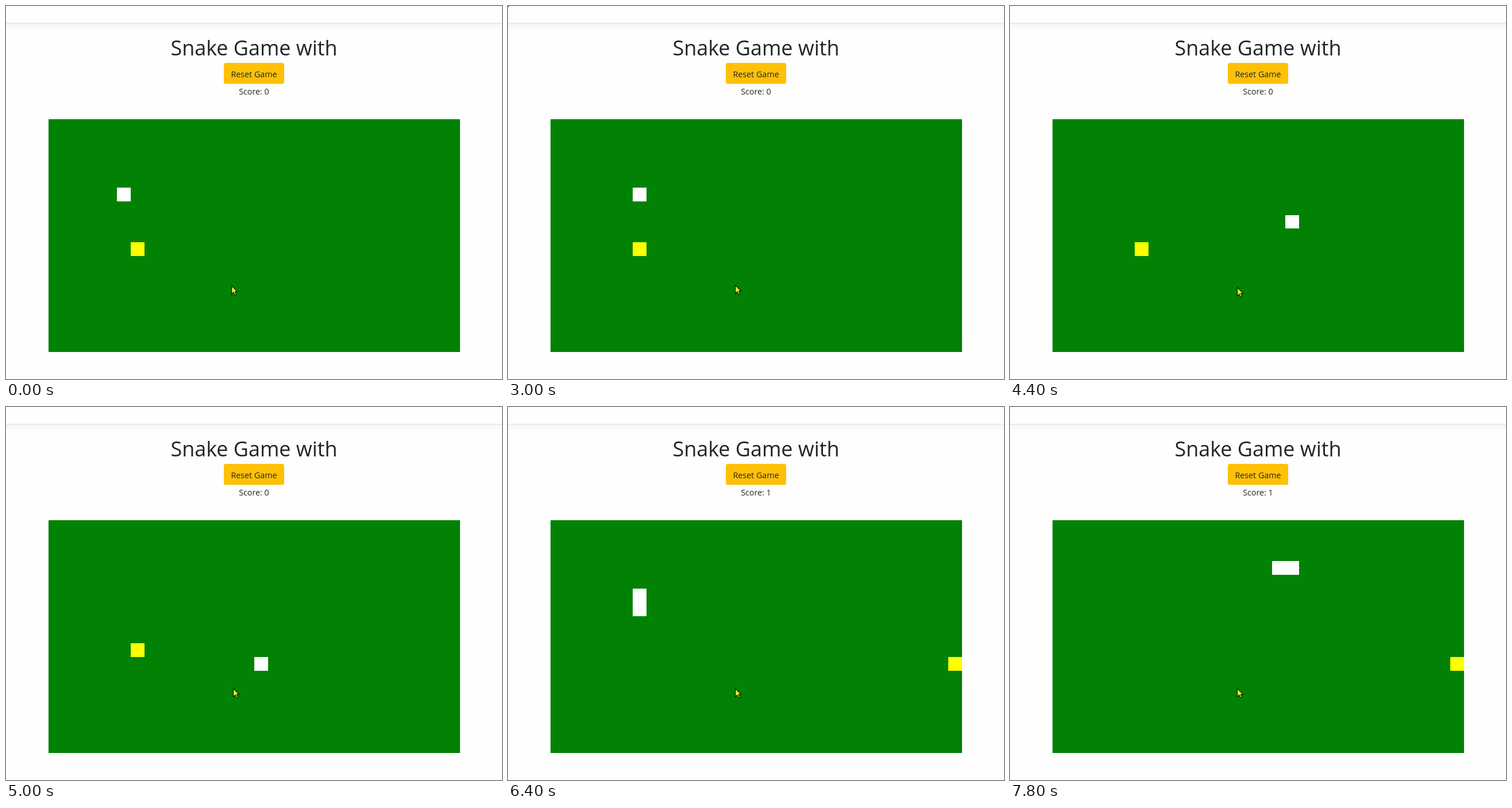
An HTML page for the animation above (8000 ms loop, 863 by 649 pixels).

```html
<!DOCTYPE html>
<html lang="en">
<head>
<meta charset="utf-8">
<title>Snake Game</title>
<style>
  html, body { margin: 0; width: 100%; height: 100%; overflow: hidden; background: #fdfefd; }
  svg { display: block; width: 863px; height: 649px; }
  text { font-family: "Open Sans", "Noto Sans", sans-serif; font-size: 14.3px; fill: #212529; text-anchor: middle; }
  .title { font-size: 35.9px; }
</style>
</head>
<body>
<svg viewBox="0 0 863 649">
  <defs>
    <linearGradient id="shade" x2="0" y2="1">
      <stop offset="0" stop-color="#f6f6fa"/>
      <stop offset="1" stop-color="#fbfbfe"/>
    </linearGradient>
  </defs>
  <rect width="863" height="649" fill="#fdfefd"/>
  <rect y="29" width="863" height="2" fill="#e9e9ec"/>
  <rect y="31" width="863" height="9" fill="url(#shade)"/>
  <rect id="speck" width="2" height="1" fill="#222"/>
  <text class="title" x="431.5" y="85.5">Snake Game with</text>
  <rect x="379" y="99" width="105" height="36.5" rx="3.5" fill="#ffc107"/>
  <text x="431.5" y="124">Reset Game</text>
  <text id="score" x="431.5" y="154">Score: 0</text>
  <rect x="74" y="197" width="716" height="405" fill="#028204"/>
  <rect id="food" fill="#ff0"/>
  <rect id="tail" fill="#fff"/>
  <rect id="head" fill="#fff"/>
  <path id="cursor" d="M.5 .8V15.2L3.8 12.2L6.2 17.3L8.7 16.2L6.4 11.2H10.8Z"
        fill="#dcf02c" stroke="#0b1a08" stroke-width="1.2"/>
</svg>
<script>
const LOOP = 8000, FRAME = 200;
const CELL = 23.87, LEFT = 73.7, TOP = 196.5;
const FIRST_MOVE = 2959, MOVE = 107.5, EAT = 29;

// Turns of the snake: dx, dy, number of cells
const turns = [[1, 0, 12], [0, 1, 5], [-1, 0, 11], [0, -1, 7], [1, 0, 12]];
const path = [[5, 5]];
for (const [dx, dy, count] of turns) {
  for (let i = 0; i < count; i++) {
    const [x, y] = path[path.length - 1];
    path.push([x + dx, y + dy]);
  }
}

// Pointer: time, x, y
const pointer = [
  [0, 392, 486], [2000, 397, 486], [2200, 408, 486], [2400, 402, 485],
  [2600, 395, 485], [3400, 395, 489]
];

const el = id => document.getElementById(id);
const [speck, score, food, tail, head, cursor] =
  ["speck", "score", "food", "tail", "head", "cursor"].map(el);

function place(rect, [col, row]) {
  const x = Math.round(LEFT + col * CELL), y = Math.round(TOP + row * CELL);
  rect.setAttribute("x", x);
  rect.setAttribute("y", y);
  rect.setAttribute("width", Math.round(LEFT + (col + 1) * CELL) - x);
  rect.setAttribute("height", Math.round(TOP + (row + 1) * CELL) - y);
}

function draw(t) {
  const moves = Math.max(0, Math.floor((t - FIRST_MOVE) / MOVE) + 1);
  const step = Math.min(moves, path.length - 1);
  const eaten = step >= EAT;
  place(head, path[step]);
  place(tail, path[eaten ? step - 1 : step]);
  place(food, eaten ? [29, 10] : [6, 9]);
  score.textContent = "Score: " + (eaten ? 1 : 0);

  const [, x, y] = pointer.filter(p => p[0] <= t).pop();
  cursor.setAttribute("transform", `translate(${x} ${y})`);
  speck.setAttribute("visibility", t >= 1000 && t < 4200 ? "visible" : "hidden");
}

const start = performance.now();
function tick() {
  const t = (performance.now() - start) % LOOP;
  draw(Math.floor(t / FRAME) * FRAME);
  requestAnimationFrame(tick);
}
tick();
</script>
</body>
</html>
```
